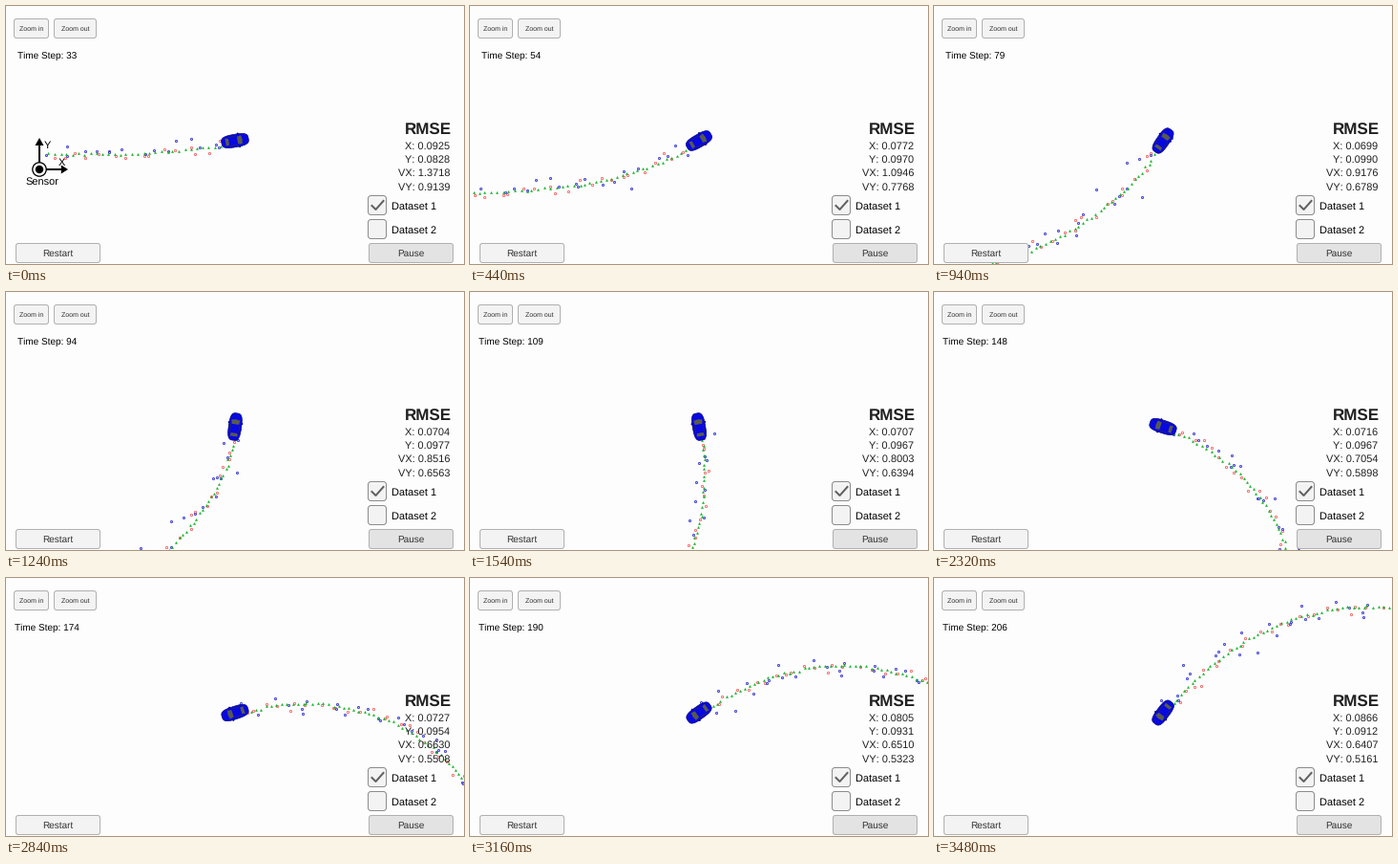
Animation of 480x270 px, one loop 3500 ms. Source, as a matplotlib script:

```python
import numpy as np
import matplotlib.pyplot as plt
from matplotlib.animation import FuncAnimation
from matplotlib.patches import Circle, FancyBboxPatch, Polygon
from matplotlib.transforms import Affine2D

plt.rcParams["text.hinting"] = "none"
plt.rcParams["text.hinting_factor"] = 1

W, H, DPI = 480, 270, 100
PX = 72 / DPI
FRAMES, INTERVAL = 175, 20
FIRST, LAST = 33, 206
CENTER = np.array([240.0, 141.0])
SENSOR = np.array([35.0, 171.0])

# heading of the car in degrees at a few steps
TURN_STEPS = (12, 33, 54, 79, 94, 109, 148, 174, 206)
TURNS = (0, 10, 30, 55, 82, 100, 162, 198, 233)

# error readouts at a few steps
RMSE_STEPS = np.array([33, 54, 79, 109, 148, 174, 206])
RMSE = {
    "X": (.0925, .0772, .0699, .0707, .0716, .0727, .0866),
    "Y": (.0828, .0970, .0990, .0967, .0967, .0954, .0912),
    "VX": (1.3718, 1.0946, .9176, .8003, .7054, .6630, .6407),
    "VY": (.9139, .7768, .6789, .6394, .5898, .5508, .5161)}


def rmse(name, step):
    """The summed squared error grows evenly between the key steps."""
    total = np.square(RMSE[name]) * RMSE_STEPS
    return np.sqrt(np.interp(step, RMSE_STEPS, total) / step)


# the path follows from heading and speed; the car slows down early on
steps = np.arange(1, LAST + 1)
heading = np.radians(np.interp(steps, TURN_STEPS, TURNS))
speed = 5.46 + 0.8 / (1 + np.exp((steps - 33) / 6))
move = speed[:, None] * np.column_stack([np.cos(heading), -np.sin(heading)])
path = np.cumsum(move, axis=0)
path += CENTER - path[FIRST - 1]

# the radar errs in range and, more with distance, in bearing
rng = np.random.default_rng(5)
track = path + (1, 2.5)
estimate = track + rng.normal(0, 0.7, path.shape)
lidar = track + rng.normal(0, 3.2, path.shape)
ray = path - SENSOR
dist = np.hypot(*ray.T)[:, None]
side = ray[:, ::-1] * (-1, 1)
radar = (path + ray / dist * rng.normal(0, 6, dist.shape)
         + side * rng.normal(0, 0.03, dist.shape))
is_radar = steps % 2 == 1

fig = plt.figure(figsize=(W / DPI, H / DPI), dpi=DPI, facecolor="#fdfdfd")
ax = fig.add_axes([0, 0, 1, 1])
ax.set_xlim(0, W)
ax.set_ylim(H, 0)
ax.axis("off")

world = Affine2D()
body = Affine2D()


def add(patch, local=None):
    if local is not None:
        patch.set_transform(local + ax.transData)
    return ax.add_patch(patch)


def label(x, y, text, size, ha="center", color="black", local=None, **kw):
    """Text whose capitals are centred on y; size in pixels."""
    t = ax.text(x, y + 0.36 * size, text, fontsize=size * PX, ha=ha, va="baseline",
                family="Liberation Sans", color=color, zorder=10, **kw)
    if local is not None:
        t.set_transform(local + ax.transData)
        t.set_zorder(2)
    return t


def box(x0, y0, x1, y1, face, edge, radius):
    add(FancyBboxPatch((x0, y0), x1 - x0, y1 - y0, fc=face, ec=edge, lw=PX,
                       boxstyle=f"round,pad=0,rounding_size={radius}", zorder=8))


def button(x0, y0, x1, y1, text, size, face="#f3f3f3"):
    box(x0 + .5, y0 + .5, x1 - .5, y1 - .5, face, "#b0b0b0", 2.5)
    label((x0 + x1) / 2, (y0 + y1) / 2, text, size, color="#323232")


def checkbox(y, text, checked):
    box(379.5, y - 10, 398.5, y + 10, "#f3f3f3", "#8c8c8c", 3)
    if checked:
        ax.plot([383.5, 387.5, 395.5], [y + .5, y + 4.5, y - 4.5], color="#606060",
                lw=2 * PX, zorder=9)
    label(403.5, y, text, 11.2, "left")


def markers(shape, size, face, edge, width, z):
    return ax.plot([], [], ls="none", marker=shape, ms=size * PX, mfc=face, mec=edge,
                   mew=width * PX, zorder=z)[0]


def sensor():
    for tip, wing in (((35, 138), (4.5, 0)), ((65, 171), (0, 4.5))):
        tip, wing = np.array(tip), np.array(wing)
        back = tip + (SENSOR - tip) * 0.24
        add(Polygon([SENSOR, back], closed=False, fill=False, ec="black",
                    lw=2 * PX, zorder=1), world)
        add(Polygon([tip, back + wing, back - wing], fc="black", lw=0, zorder=1), world)
    add(Circle(SENSOR, 7.2, fc="white", ec="black", lw=1.3 * PX, zorder=1.5), world)
    add(Circle(SENSOR, 4.2, fc="black", lw=0, zorder=1.6), world)
    label(38, 183, "Sensor", 10.7, local=world)
    label(58.5, 163, "X", 10.7, local=world)
    label(43, 145, "Y", 10.7, local=world)


def car():
    def part(points, color, z, edge="none"):
        add(Polygon(points, fc=color, ec=edge, lw=.7 * PX, zorder=z), body)

    t = np.linspace(0, 2 * np.pi, 60)
    c, s = np.cos(t), np.sin(t)
    hull = np.column_stack([14.3 * np.sign(c) * abs(c) ** .7,
                            6.7 * np.sign(s) * abs(s) ** .6])
    part(hull, "#0808e0", 5.1, "#080870")
    part([(7, -4.6), (7.8, 0), (7, 4.6), (2.6, 3.8), (2.6, -3.8)], "#585a50", 5.3)
    part([(-6.6, -3.4), (-6.6, 3.4), (-10, 4), (-10, -4)], "#585a50", 5.3)
    for flank in (-1, 1):
        part([(2, 4.3 * flank), (-6, 4.1 * flank), (-6, 4.9 * flank), (2, 5.2 * flank)],
             "#20246a", 5.3)
        add(Circle((4, 6.9 * flank), 1, fc="#080870", lw=0, zorder=5), body)


sensor()
car()
green = markers("^", 2.3, "#12b024", "#12b024", .3, 4)
red = markers("o", 2.3, "#fdfdfd", "#ee4444", .7, 3)
blue = markers("o", 2.2, "#c4c4f4", "#3030cc", .8, 3.5)

button(8, 13, 45, 34, "Zoom in", 6.8)
button(50, 13, 95, 34, "Zoom out", 6.8)
button(10, 248, 99, 269, "Restart", 9.6)
button(380, 248, 469, 269, "Pause", 9.6, "#e3e3e3")
checkbox(208.5, "Dataset 1", True)
checkbox(233.5, "Dataset 2", False)
counter = label(43, 51.6, "", 9.7)
label(466.5, 129, "RMSE", 17, "right", "#202020", weight="bold")
readouts = {name: label(465.5, 146 + 14.2 * i, "", 11, "right", "#202020")
            for i, name in enumerate(RMSE)}


def update(k):
    step = max(FIRST, FIRST - 1 + k)
    shift = CENTER - path[step - 1]
    world.clear().translate(*shift)
    body.clear().rotate(-heading[step - 1]).translate(*CENTER)
    seen = steps <= step
    for line, points, keep in ((green, estimate, seen), (red, lidar, seen & ~is_radar),
                               (blue, radar, seen & is_radar)):
        line.set_data(*(points[keep] + shift).T)
    counter.set_text(f"Time Step: {step}")
    for name, text in readouts.items():
        text.set_text(f"{name}: {rmse(name, step):.4f}")
    return []


anim = FuncAnimation(fig, update, frames=FRAMES, interval=INTERVAL, repeat=True,
                     repeat_delay=0, init_func=lambda: update(0))
plt.show()
```
